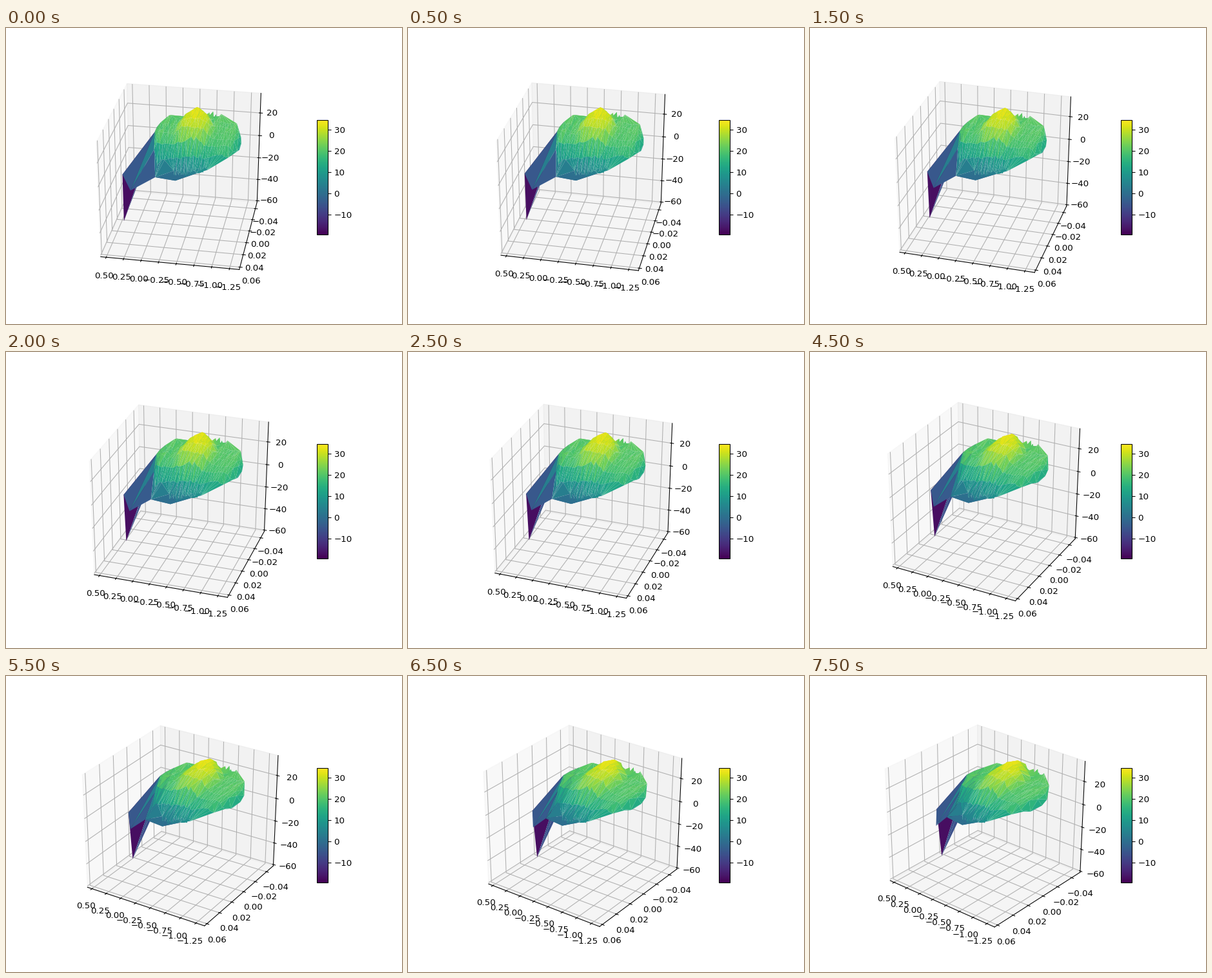
Write a matplotlib script that moves like this. It is 614 px wide and 460 px high and loops after 8 s.

```python
import numpy as np
import matplotlib.pyplot as plt
from matplotlib.animation import FuncAnimation
from matplotlib.tri import Triangulation

W, H, DPI = 614, 460, 96
FRAMES, INTERVAL = 16, 500
ELEV, AZIM, STEP = 30, 100, 2

# visible axis limits
XLIM, YLIM, ZLIM = (-1.387, 0.579), (-0.0523, 0.0638), (-61.2, 37.1)
HALF = 25 / 48  # box coordinates run from -HALF to HALF

# corners of the downward spike: tip, shoulder, fold, front lip
SPIKE = [(.456, -.002, -.5), (.444, .059, -.015), (.363, .157, -.10),
         (.15, .27, .11)]
CENTRE, RADIUS = (-.11, -.07), (.32, .34)
ROWS, PER_ROW, STRETCH = 8, 32, 5


def height(u, v):
    """Plateau that sags at the front and right, with a steep hill on it."""
    sag = (.19 + .33 * u) * (np.clip(v, 0, None) / .25) ** 1.5
    droop = .1 * np.clip((-u - .38) / .05, 0, 1)
    d2 = ((u + .075) / .125) ** 2 + ((v + .1) / .24) ** 2
    hill = np.exp(-d2 ** 3) * (.11 - .25 * (v + .1))
    return .34 - sag - droop + hill


def plateau(rng):
    """Rows of points across a rounded patch, rougher along its rim."""
    rows = []
    for q in np.linspace(-.96, .96, ROWS):
        reach = (1 - abs(q) ** 2.5) ** .4
        s = np.linspace(-1, 1, PER_ROW)
        s[1:-1] += rng.uniform(-.02, .02, PER_ROW - 2)
        u = CENTRE[0] + RADIUS[0] * reach * s
        v = CENTRE[1] + RADIUS[1] * q + rng.normal(0, .008, PER_ROW)
        rim = np.maximum(abs(s), abs(q)) ** 8
        w = height(u, v) + rng.normal(0, 1, PER_ROW) * (.007 + .018 * rim)
        rows.append(np.column_stack([u, v, w]))
    return np.vstack(rows)


def to_data(t, lim):
    return lim[0] + (t + HALF) / (2 * HALF) * (lim[1] - lim[0])


u, v, w = np.vstack([SPIKE, plateau(np.random.default_rng(4))]).T
# stretching the patch makes its triangles long and narrow
mesh = Triangulation(np.where(u < .2, .2 + STRETCH * (u - .2), u), v)

fig = plt.figure(figsize=(W / DPI, H / DPI), dpi=DPI)
fig.subplots_adjust(left=76.8 / W, right=552.96 / W,
                    bottom=50.69 / H, top=405.5 / H)
ax = fig.add_subplot(projection="3d")
# let the cube fill the whole axes rectangle
ax.apply_aspect = lambda position=None: None
ax.set_box_aspect((1, 1, 1), zoom=np.sqrt(3) / 1.8294640721620434)

surf = ax.plot_trisurf(to_data(u, XLIM), to_data(v, YLIM), to_data(w, ZLIM),
                       triangles=mesh.triangles, cmap="viridis", linewidth=0)
surf.set_clim(-19.1, 34.5)
fig.colorbar(surf, ax=ax, shrink=0.5, aspect=10, fraction=0.15, pad=0.05)

ax.set_xticks(np.arange(-1.25, 0.51, 0.25))
ax.set_yticks(np.arange(-2, 4) * 0.02)
ax.set_zticks(np.arange(-60, 21, 20))
ax.set_xlim(*XLIM, view_margin=0)
ax.set_ylim(*YLIM, view_margin=0)
ax.set_zlim(*ZLIM, view_margin=0)


def update(i):
    ax.view_init(elev=ELEV, azim=AZIM + STEP * i)
    return (surf,)


anim = FuncAnimation(fig, update, frames=FRAMES, interval=INTERVAL,
                     repeat=True, repeat_delay=0, blit=False)
plt.show()
```
